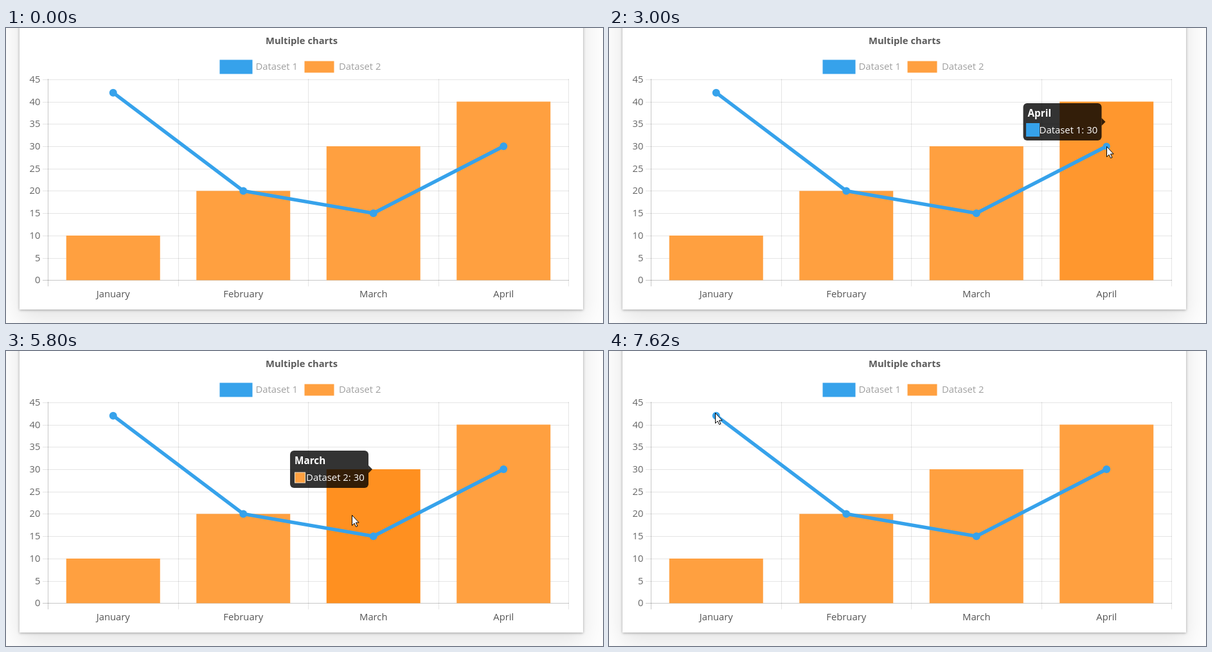
Animation of 929 by 459 pixels, one loop 8000 ms. Source, as an HTML page with a canvas:

```html
<!DOCTYPE html>
<html lang="en">
<head>
<meta charset="utf-8">
<title>Multiple charts</title>
<style>
html, body { margin: 0; width: 100%; height: 100%; overflow: hidden; background: #fdfdfd; }
.card {
  position: absolute; left: 21px; top: -60px; width: 877px; height: 498px; background: #fff;
  box-shadow: 0 1px 4px rgba(0,0,0,.32), 0 14px 34px rgba(0,0,0,.1);
}
canvas { position: absolute; left: 0; top: 0; }
</style>
</head>
<body>
<div class="card"></div>
<canvas id="stage" width="929" height="459"></canvas>
<script>
const ctx = document.getElementById('stage').getContext('2d');
const LOOP = 8000, FADE = 400, SAMPLE = 5;
const LEFT = 65.5, STEP = 202.5, BASE = 392.4, UNIT = 312.6 / 45;
const BAR_W = 146, DOT_R = 6, TIP_W = 122, TIP_H = 58;
const BLUE = '#36a2eb', ORANGE = '#ffa040';
const MONTHS = ['January', 'February', 'March', 'April'];
const LINE = [42, 20, 15, 30], BARS = [10, 20, 30, 40];

const midX = i => LEFT + STEP * (i + .5);
const valueY = v => BASE - v * UNIT;
const lerp = (a, b, k) => a + (b - a) * k;
const clamp = k => Math.max(0, Math.min(1, k));
const easeOut = k => 1 - (1 - k) ** 4;
const smooth = k => k * k * (3 - 2 * k);

// Pointer moves; dot is the line point a move settles on
const ENTRY = { x: 895, y: 456 };
const MOVES = [
  { from: 810, to: 1500, x: 794, y: 246 },
  { from: 2510, to: 3040, x: 774, y: 184, dot: 3 },
  { from: 3040, to: 3490, x: 769, y: 183, dot: 3 },
  { from: 4430, to: 4950, x: 547, y: 251 },
  { from: 5740, to: 6180, x: 373, y: 339 },
  { from: 6590, to: 7200, x: 151, y: 82 },
  { from: 7200, to: 7620, x: 165, y: 97 }
];

function pointerAt(t) {
  let { x, y } = ENTRY, dot;
  for (const m of MOVES) {
    if (t < m.from) break;
    const k = smooth(clamp((t - m.from) / (m.to - m.from)));
    x = lerp(x, m.x, k);
    y = lerp(y, m.y, k);
    dot = m.dot;
  }
  return { x, y, dot };
}

// Hovered item as month and dataset, or undefined
function hit({ x, y, dot }) {
  if (dot !== undefined && Math.hypot(x - midX(dot), y - valueY(LINE[dot])) < DOT_R) {
    return { month: dot, set: 1 };
  }
  const month = BARS.findIndex((v, i) =>
    Math.abs(x - midX(i)) < BAR_W / 2 && y > valueY(v) && y < BASE);
  return month < 0 ? undefined : { month, set: 2 };
}

// Every moment at which the hovered item changes
const hovers = [];
for (let t = MOVES[0].from, last = ''; t < LOOP; t += SAMPLE) {
  const item = hit(pointerAt(t)), key = item ? item.month + '/' + item.set : '';
  if (key !== last) hovers.push({ t, item });
  last = key;
}

const valueOf = ({ month, set }) => (set === 1 ? LINE : BARS)[month];

function tipPlace(item) {
  const x = midX(item.month) + (item.month > 1 ? -7.7 - TIP_W : 8.3);
  return [x, valueY(valueOf(item)) - TIP_H / 2];
}

// State: tooltip x, y, opacity, then one highlight per bar and per dot
function hoverState(t) {
  let shown = hovers[0].item, active;
  let state = [...tipPlace(shown), 0, ...BARS.map(() => 0), ...LINE.map(() => 0)];
  hovers.forEach(({ t: start, item }, i) => {
    if (t < start) return;
    const next = hovers[i + 1];
    const k = easeOut(clamp((Math.min(t, next ? next.t : LOOP) - start) / FADE));
    const glow = (set, values) => values.map((_, m) => +(!!item && item.set === set && item.month === m));
    const place = item ? tipPlace(item) : state.slice(0, 2);
    const goal = [...place, item ? 1 : 0, ...glow(2, BARS), ...glow(1, LINE)];
    if (item && !active) state[2] = 0;
    state = state.map((v, j) => lerp(v, goal[j], k));
    shown = item || shown;
    active = item;
  });
  return { x: state[0], y: state[1], alpha: state[2], bars: state.slice(3, 7), dots: state.slice(7), shown };
}

function text(str, x, y, color, size = 14.8, align = 'left', weight = 400) {
  ctx.font = `${weight} ${size}px "Open Sans", "Noto Sans", sans-serif`;
  ctx.textAlign = align;
  ctx.fillStyle = color;
  ctx.fillText(str, x, y);
}

function rect(x, y, w, h, color) {
  ctx.fillStyle = color;
  ctx.fillRect(x, y, w, h);
}

function drawGrid() {
  const gridColor = i => `rgba(0,0,0,${i ? .1 : .22})`;
  text('Multiple charts', 460, 25, '#5a5a5a', 14.75, 'center', 700);
  rect(332.5, 49.5, 51, 22, BLUE);
  rect(464.5, 51.5, 46, 18, ORANGE);
  text('Dataset 1', 388.5, 65, '#a0a0a0');
  text('Dataset 2', 518, 65, '#a0a0a0');
  for (let v = 0; v <= 45; v += 5) {
    const y = Math.round(valueY(v));
    rect(57, y, 819, 1, gridColor(v));
    text(v, 53.5, y + 5, '#666', 14.8, 'right');
  }
  for (let i = 0; i <= 4; i++) rect(Math.floor(LEFT + STEP * i), 79, 1, 323, gridColor(i));
  MONTHS.forEach((m, i) => text(m, midX(i), 419, '#555', 14.8, 'center'));
}

function drawBars(glow) {
  BARS.forEach((v, i) => {
    const color = `rgb(255,${lerp(160, 144, glow[i])},${lerp(64, 32, glow[i])})`;
    rect(midX(i) - BAR_W / 2, valueY(v), BAR_W, v * UNIT, color);
  });
}

function drawLine(glow) {
  ctx.strokeStyle = ctx.fillStyle = BLUE;
  ctx.lineWidth = 5.6;
  ctx.beginPath();
  LINE.forEach((v, i) => ctx.lineTo(midX(i), valueY(v)));
  ctx.stroke();
  LINE.forEach((v, i) => {
    ctx.beginPath();
    ctx.arc(midX(i), valueY(v), DOT_R - glow[i], 0, 7);
    ctx.fill();
  });
}

function drawTip({ x, y, alpha, shown }) {
  const { month, set } = shown;
  const side = month > 1 ? TIP_W : 0, point = month > 1 ? TIP_W + 6 : -6;
  ctx.save();
  ctx.globalAlpha = alpha;
  ctx.translate(x, y);
  ctx.fillStyle = 'rgba(0,0,0,.8)';
  ctx.beginPath();
  ctx.roundRect(0, 0, TIP_W, TIP_H, 6);
  ctx.fill();
  ctx.beginPath();
  ctx.moveTo(side, TIP_H / 2 - 6);
  ctx.lineTo(point, TIP_H / 2);
  ctx.lineTo(side, TIP_H / 2 + 6);
  ctx.fill();
  text(MONTHS[month], 7, 21, '#fff', 15.3, 'left', 700);
  if (set === 1) rect(4.5, 31, 21, 21, BLUE);
  else {
    rect(7, 33.5, 17, 17, '#ffe3c8');
    rect(8, 34.5, 15, 15, ORANGE);
  }
  text(`Dataset ${set}: ${valueOf(shown)}`, 25, 46.5, '#fff', 14.9);
  ctx.restore();
}

const ARROW = new Path2D('M.5 .5V16.5L4 13L6.7 18.5L9 17.4L6.4 12H11.2Z');

function drawPointer(t) {
  if (t < MOVES[0].from) return;
  const { x, y } = pointerAt(t);
  ctx.save();
  ctx.translate(Math.round(x), Math.round(y) - 1);
  ctx.fillStyle = '#fff';
  ctx.strokeStyle = '#000';
  ctx.lineWidth = 1;
  ctx.fill(ARROW);
  ctx.stroke(ARROW);
  ctx.restore();
}

function draw(t) {
  const hover = hoverState(t);
  ctx.clearRect(0, 0, 929, 459);
  drawGrid();
  drawBars(hover.bars);
  drawLine(hover.dots);
  drawTip(hover);
  drawPointer(t);
}

const begin = performance.now();
function tick() {
  draw((performance.now() - begin) % LOOP);
  requestAnimationFrame(tick);
}
tick();
</script>
</body>
</html>
```
